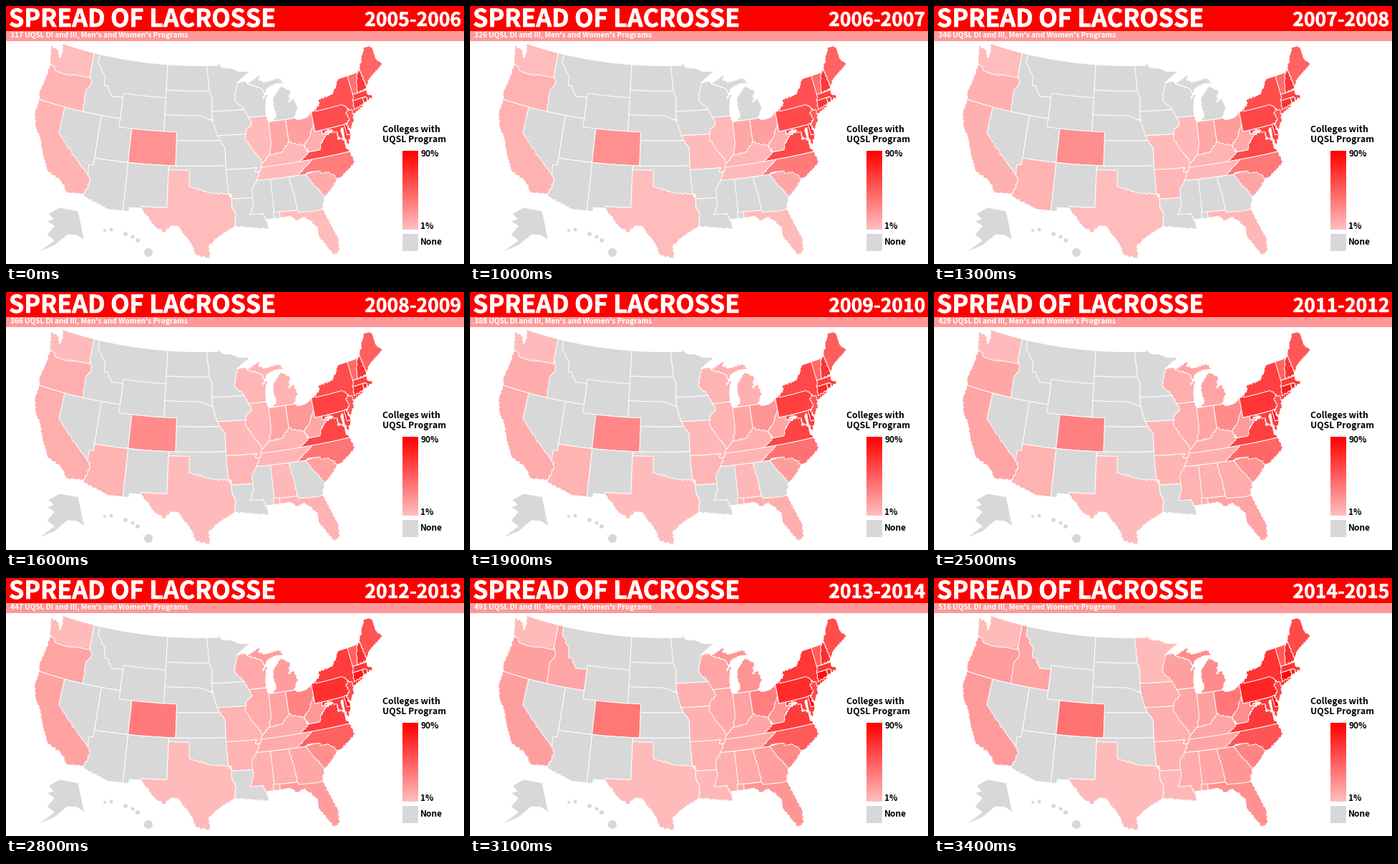
Animation of 640 by 360 pixels, one loop 4.4 s. Source, as a matplotlib script:

```python
import numpy as np
import matplotlib.pyplot as plt
from matplotlib.animation import FuncAnimation
from matplotlib.patches import Circle, Polygon, Rectangle
from matplotlib.patheffects import withStroke

W, H, DPI = 640, 360, 100
PX = 72 / DPI
ORG = "UQSL"
RED, PINK, GREY = "#ff0000", "#ff9999", "#d8d8d8"
PALE = 190  # green and blue level at the low end of the scale
LAST = 9
COUNTS = [317, 326, 346, 366, 388, 411, 429, 447, 491, 516]

fig = plt.figure(figsize=(W / DPI, H / DPI), dpi=DPI, facecolor="white")
ax = fig.add_axes([0, 0, 1, 1])
states = []


def shade(share):
    level = PALE * (1 - share / 90) / 255
    return (1, level, level)


def project(west, lat):
    """Albers conic with a slight bend, from degrees west and north to pixels."""
    s1, s2 = np.sin(np.radians([29.5, 45.5]))
    n = (s1 + s2) / 2
    rho = np.sqrt(1 - s1**2 + 2 * n * (s1 - np.sin(np.radians(lat)))) / n
    turn = n * np.radians(96 - west)
    x, y = rho * np.sin(turn), rho * np.cos(turn)
    px = 294 + 685 * x + 20 * (y - 1.3) - 25 * x**2 * (1 + 2.8 * x)
    py = 83 + 666 * (y - 1.1018) - 20 * x + 350 * x**2 * (y - 1.3)
    return np.column_stack([px, py])


def trace(corners):
    """Surveyed lines stay straight; rivers and coasts wander between corners."""
    t = np.linspace(0, 1, 16, endpoint=False)
    path = []
    for (w0, n0), (w1, n1) in zip(corners, np.roll(corners, -1, axis=0)):
        west, lat = w0 + (w1 - w0) * t, n0 + (n1 - n0) * t
        if min(abs(w1 - w0), abs(n1 - n0)) > 0.12:
            sway = 0.1 * np.sin(np.pi * t)
            west, lat = (west + sway * np.sin(11 * lat + 5 * west),
                         lat + sway * np.sin(12 * west - 6 * lat))
        path.append(project(west, lat))
    return np.vstack(path)


def add_land(points):
    shape = Polygon(points, closed=True, fc=GREY, ec="white", lw=PX,
                    joinstyle="round")
    ax.add_patch(shape)
    return shape


def state(growth, *pts):
    """growth is (first season, share then, share in the last season)."""
    states.append((add_land(trace(np.reshape(pts, (-1, 2)))), growth))


def block(w, s, e, n, growth=None):
    state(growth, w, s, e, s, e, n, w, n)


def fill_at(growth, season):
    if not growth:
        return GREY
    first, low, high, *until = growth
    if season < first or (until and season > until[0]):
        return GREY
    u = (season - first) / max(LAST - first, 1)
    return shade(low + (high - low) * u**1.4)


def box(x, y, w, h, color):
    ax.add_patch(Rectangle((x, y), w, h, fc=color, ec="none"))


def label(x, y, text, size, color="black", ha="left", heavy=0):
    item = ax.text(x, y, text, fontsize=size * PX, color=color, ha=ha,
                   va="baseline", weight="bold",
                   family=["Noto Sans CJK JP", "Liberation Sans"])
    if heavy:
        item.set_path_effects([withStroke(linewidth=heavy * PX, foreground=color)])
    return item


# Each state reaches under the ones drawn after it, which carry the shared border.
# Mountains and plains
block(116.05, 44.4, 104.05, 49)     # Montana
block(104.05, 45.94, 96.6, 49)      # North Dakota
block(104.05, 42.5, 96.45, 45.94)   # South Dakota
state(None, 104.05, 43, 98.5, 43, 96, 42.3, 95.3, 40, 104.05, 40)  # Nebraska
block(102.05, 37, 94.62, 40)        # Kansas
block(114.05, 37, 109.05, 42)       # Utah
block(111.05, 41, 104.05, 45)       # Wyoming
block(109.05, 37, 102.05, 41, (0, 21, 36))  # Colorado
block(120, 35, 114.05, 42)          # Nevada
block(103, 33.6, 94.45, 37)         # Oklahoma
# New Mexico
state(None, 109.05, 37, 103.04, 37, 103.04, 32, 106.6, 32, 106.5, 31.78,
      108.2, 31.78, 108.2, 31.33, 109.05, 31.33)
# Arizona
state((2, 5, 6, 6), 114.05, 37, 109.05, 37, 109.05, 31.33, 111.07, 31.33,
      114.8, 32.5, 114.15, 34.3, 114.63, 35, 114.7, 36.1, 114.05, 36.2)

# Pacific
# Oregon
state((0, 5, 16), 123.9, 46.2, 116.5, 46.2, 116.5, 42, 124.2, 42, 124.5, 42.8,
      124.1, 44.5)
# Washington
state((0, 1, 2), 124.65, 48.35, 123.2, 48.15, 122.7, 47.3, 122.4, 48, 122.75, 49,
      117.03, 49, 117, 46, 119, 45.95, 121.2, 45.65, 122.8, 45.7, 123.2, 46.15,
      124, 46.25)
# California
state((0, 5, 17), 124.2, 42, 120, 42, 120, 39, 114.63, 35, 114.15, 34.3,
      114.72, 32.72, 117.1, 32.53, 118.4, 33.8, 120.5, 34.5, 121.9, 36.6,
      122.5, 37.7, 123.75, 39, 124.35, 40.4)
# Idaho
state((8, 12, 13), 117.03, 49, 116.05, 49, 116.05, 48, 114.5, 46.6, 114.4, 45.5,
      113.8, 45.5, 112.9, 44.4, 111.05, 44.5, 111.05, 42, 117.03, 42, 117.2, 44.4,
      116.5, 45.4, 117.03, 46.3)

# Along the Mississippi
# Minnesota
state((9, 2, 2), 97.2, 49, 95.15, 49, 95.15, 49.35, 94.6, 48.75, 93, 48.6,
      91.5, 48.1, 89.6, 48, 92.1, 46.75, 91, 46, 91, 43.5, 96.45, 43.5,
      96.45, 45.3, 96.8, 45.7)
# Iowa
state((8, 7, 8), 96.5, 43.5, 90.2, 43.5, 90.2, 40.6, 95.77, 40.6, 96.4, 42.5)
# Missouri
state((1, 2, 7), 95.77, 40.6, 90, 40.6, 89.1, 37, 89, 36, 90.37, 36, 90.1, 36.5,
      94.62, 36.5, 94.62, 39.1)
# Arkansas
state((2, 4, 6), 94.62, 36.5, 90.1, 36.5, 90.37, 36, 89.5, 36, 90.5, 34, 90.5, 33,
      94.04, 33, 94.04, 33.55, 94.45, 33.65)
# Louisiana
state((8, 3, 3), 94.04, 33, 90.5, 33, 90.5, 31, 89.75, 31, 89.3, 29.8, 89.2, 29.1,
      91.3, 29.4, 93.8, 29.7, 93.55, 31.1, 94.04, 32)
# Texas
state((0, 1, 2), 103.04, 36.5, 100, 36.5, 100, 34.56, 97, 33.8, 94.45, 33.6,
      94.04, 33, 94.04, 32, 93.55, 31.1, 93.8, 29.7, 96, 28.5, 97.3, 27.5,
      97.15, 25.9, 99.1, 26.4, 99.5, 27.5, 101.4, 29.8, 102.3, 29.85, 103.2, 29,
      104.5, 29.65, 106.6, 31.8, 106.6, 32, 103.04, 32)
# Mississippi
state((5, 5, 9), 90.3, 35, 88, 35, 88, 30.3, 89.55, 30.25, 89.75, 31, 91.6, 31,
      91, 32.3, 91.1, 33.9)
# Wisconsin
state((3, 4, 14), 92.1, 46.75, 90.8, 46.9, 90.4, 46.55, 88.1, 45.85, 87.65, 45.1,
      88, 44.55, 87.1, 45.2, 87.7, 43.7, 87.8, 42.5, 90.64, 42.5, 91.2, 43.5,
      92.75, 44.75, 92.3, 46.1)
# Michigan, both peninsulas
state((3, 5, 24), 90.4, 46.55, 88, 47.45, 88.4, 46.9, 87.4, 46.5, 85, 46.75,
      84, 46, 85.5, 46.1, 87, 45.75, 87.65, 45.1, 88.1, 45.85)
state((3, 5, 24), 86.8, 41.75, 83.45, 41.73, 82.5, 42.8, 82.95, 44.05, 83.85, 43.7,
      83.3, 45, 84.7, 45.75, 86.25, 44.6, 86.5, 43.6, 86.2, 42.5)
block(88, 37.5, 84.8, 41.75, (0, 11, 14))  # Indiana
# Illinois
state((0, 2, 12), 90.64, 42.5, 87.8, 42.5, 87.53, 41.75, 87.53, 39.3, 88.05, 37.85,
      88.5, 37, 89.15, 37, 90.2, 38.4, 91.4, 39.9, 91.4, 40.4, 91.1, 41.2, 90.2, 41.8)
# Ohio
state((0, 14, 33), 84.8, 41.72, 83.45, 41.73, 82.7, 41.45, 81.7, 41.5, 80.52, 41.98,
      80.52, 40, 81, 38.5, 82, 38.3, 84.8, 38.3)

# South
# Kentucky
state((0, 4, 12), 89.15, 37, 88.1, 37.8, 86, 38, 84.8, 39.1, 83.7, 38.65, 82.6, 38.4,
      82, 37, 83, 36.4, 89.4, 36.4)
# Virginia
state((0, 55, 63), 83.67, 36.6, 75.87, 36.55, 76.3, 37, 76.3, 38, 77.3, 38.3, 77, 39,
      77.75, 39.3, 79, 39, 81, 37.5, 81.97, 37.53)
# Tennessee
state((0, 2, 12), 89.5, 36.5, 83.67, 36.6, 81.68, 36.6, 83, 35, 90.3, 35, 89.7, 36)
block(88.25, 31, 85, 35, (3, 3, 12))       # Alabama
block(88.4, 30.3, 87.5, 31.05, (3, 3, 12))
# Georgia
state((5, 7, 19), 85.6, 35, 83, 35, 81.5, 34, 80.9, 32.05, 81.45, 30.75, 82, 30.4,
      85, 30.6, 85, 31, 85.15, 32.8)
# Florida
state((0, 1, 22), 87.55, 31, 85, 31, 84.85, 30.7, 82.2, 30.6, 81.45, 30.7,
      80.55, 28.4, 80.05, 27, 80.2, 25.6, 81, 25.15, 81.8, 26.2, 82.7, 27.6,
      82.65, 28.7, 84.2, 30.1, 85.3, 29.75, 86.2, 30.4, 87.5, 30.3)
# South Carolina
state((0, 10, 28), 83.1, 35, 79.5, 35.4, 78.55, 33.85, 79.3, 33.1, 80.9, 32.05)
# North Carolina
state((0, 31, 50), 81.68, 36.6, 75.87, 36.55, 75.5, 35.25, 76.5, 34.65, 77.9, 33.9,
      78.55, 33.85, 79.7, 34.8, 80.8, 34.8, 81, 35.1, 82.3, 35.2, 83.1, 35,
      84.32, 35, 83.1, 35.8)

# Northeast
# Maryland
state((0, 57, 64), 79.48, 39.72, 75.5, 39.72, 75.5, 38.45, 75.05, 38.45, 75.9, 37.2,
      76.2, 38.3, 76.1, 39.4, 76.5, 39.2, 76.4, 38.2, 77.2, 38.4, 77.05, 38.9,
      77.75, 39.3, 78.4, 39.6, 79.48, 39.2)
# West Virginia
state((0, 8, 23), 80.52, 40.64, 80.52, 39.72, 79.48, 39.72, 79.48, 39.2, 78.4, 39.6,
      77.75, 39.3, 78.35, 39.4, 79.7, 38.5, 80.3, 37.5, 81.97, 37.53, 82.6, 38.4,
      81.7, 39)
# New York
state((0, 51, 66), 79.76, 42.27, 78.9, 42.9, 79.05, 43.27, 76.5, 43.5, 75, 45,
      72.5, 45, 72.5, 41.5, 72, 41.05, 73.9, 40.55, 74.5, 40.9, 75, 41.5, 79.76, 41.8)
# Pennsylvania
state((0, 54, 73), 80.52, 41.98, 79.76, 42.27, 79.76, 42, 75.35, 42, 74.5, 41.3,
      74.5, 40.2, 75.5, 39.72, 80.52, 39.72)
# New Jersey
state((0, 47, 57), 74.7, 41.35, 73.95, 41, 74.1, 39.8, 74.9, 38.95, 75.5, 39.5,
      74.75, 40.2, 75.1, 40.8)
# Delaware
state((0, 64, 90), 75.79, 39.72, 75.5, 39.8, 75.05, 38.45, 75.7, 38.46)
# Vermont
state((0, 37, 47), 73.35, 45, 71.5, 45, 71.5, 42.73, 73.25, 42.75)
# New Hampshire
state((0, 64, 70), 71.5, 45, 71.05, 45.3, 70.7, 43.07, 70.8, 42.87, 72.45, 42.73,
      72.1, 44)
# Maine
state((0, 42, 55), 71.05, 45.3, 70, 46.7, 69.25, 47.45, 68.3, 47.35, 67.8, 47.05,
      67.8, 45.7, 67, 44.8, 69.8, 43.8, 70.7, 43.07)
# Massachusetts
state((0, 58, 66), 73.25, 42.75, 71.3, 42.7, 70.8, 42.87, 70.9, 42.3, 70, 41.75,
      71.1, 41.5, 71.35, 42.02, 73.5, 42.05)
state((0, 64, 86), 73.5, 42.05, 71.8, 42.02, 71.85, 41.32, 73.65, 41)     # Connecticut
state((0, 64, 78), 71.8, 42.02, 71.35, 42.02, 71.15, 41.5, 71.85, 41.32)  # Rhode Island

# Alaska and Hawaii
add_land([(59, 290), (75, 281), (101, 286), (108, 319), (110, 327), (99, 320),
          (86, 319), (68, 334), (44, 344), (67, 327), (57, 319), (67, 307),
          (57, 300), (66, 297)])
for x, y, r in [(138, 313, 2), (147, 312, 2.5), (167, 318, 3), (177, 322, 2.5),
                (184, 327, 3), (199, 344, 6)]:
    ax.add_patch(Circle((x, y), r, fc=GREY, ec="none"))

# Header
box(0, 0, W, 34.5, RED)
box(0, 34.5, W, 14, PINK)
label(4, 29, "SPREAD OF LACROSSE", 34.1, "white", heavy=0.7)
years = label(636, 28, "", 26.5, "white", "right", heavy=0.5)
programs = label(6, 44.2, "", 10.1, "white")

# Legend
label(526, 176, "Colleges with", 12.2)
label(526, 190, f"{ORG} Program", 12.2)
ramp = np.array([[shade(s)] for s in np.linspace(90, 0, 110)])
ax.imshow(ramp, extent=(554, 576, 312, 202), aspect="auto", interpolation="bilinear")
box(554, 318, 22, 24, GREY)
for y, text in [(210.5, "90%"), (311, "1%"), (333, "None")]:
    label(579, y, text, 11.9)

ax.set_xlim(0, W)
ax.set_ylim(H, 0)
ax.axis("off")


def update(i):
    season = min(max((i - 7) // 3, 0), LAST)
    for shape, growth in states:
        shape.set_facecolor(fill_at(growth, season))
    years.set_text(f"{2005 + season}-{2006 + season}")
    programs.set_text(f"{COUNTS[season]} {ORG} DI and III, Men's and Women's Programs")
    return [shape for shape, _ in states] + [years, programs]


anim = FuncAnimation(fig, update, frames=44, interval=100, repeat=True,
                     repeat_delay=0, blit=False)
plt.show()
```
